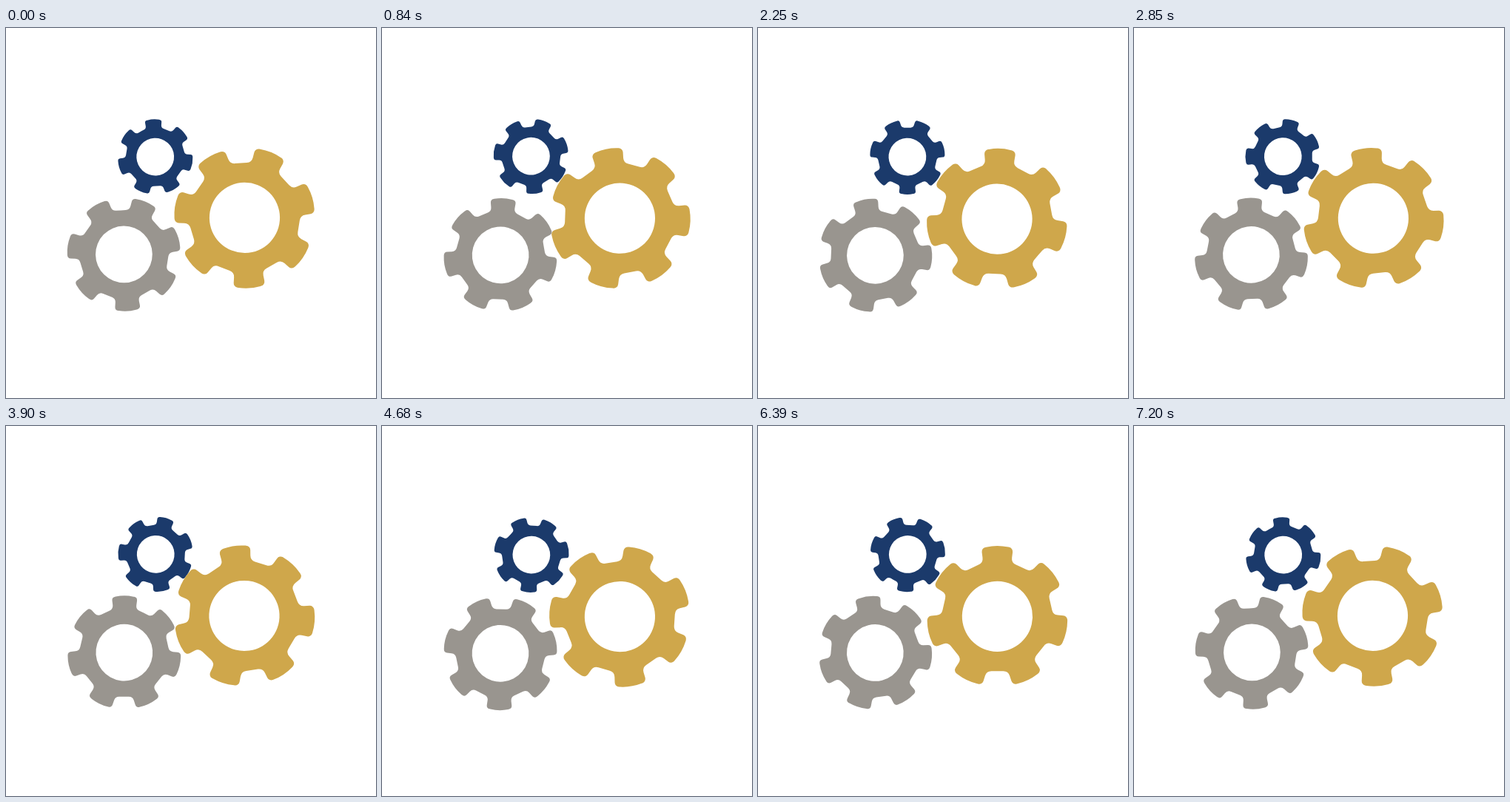
Recreate the animation shown at these times as an HTML page with a canvas. Size 500 px wide and 500 px high, loop 7260 ms.

```html
<!DOCTYPE html>
<html lang="en">
<head>
<meta charset="utf-8">
<title>Gears</title>
<style>
  html, body { margin: 0; height: 100%; overflow: hidden; background: #fff; }
  canvas { display: block; }
</style>
</head>
<body>
<canvas id="stage" width="500" height="500"></canvas>
<script>
const ctx = document.getElementById('stage').getContext('2d');
const TEETH = 7, STEP = 30, TURN_TIME = 7200, LOOP = 7260;

// x, y: pivot; dx, dy: how far the gear sits off its pivot; turns per loop, clockwise
const gears = [
  { x: 201.8, y: 173.6, dx: -0.1, dy: 0.5, size: 0.533, phase: -3.2, turns: 3, color: '#1b3a6b' },
  { x: 159.2, y: 306.8, dx: 0.2, dy: -0.9, size: 0.806, phase: 21.8, turns: 2, color: '#99958f' },
  { x: 322.4, y: 257.4, dx: 0.1, dy: -1, size: 1, phase: 21.8, turns: -2, color: '#cfa74b' }
];

// One tooth pointing up: x, y, corner radius
const tooth = [
  [-19, -73, 9], [-21.5, -92.3, 6], [0, -97, 70], [21.5, -92.3, 6], [19, -73, 9]
];

const rad = deg => deg * Math.PI / 180;

function gearPath() {
  const path = new Path2D();
  const points = [];
  for (let i = 0; i < TEETH; i++) {
    const a = 2 * Math.PI * i / TEETH, c = Math.cos(a), s = Math.sin(a);
    for (const [x, y, r] of tooth) points.push([x * c - y * s, x * s + y * c, r]);
  }
  // Start in the middle of the valley before the first tooth
  const first = points[0], last = points[points.length - 1];
  path.moveTo((first[0] + last[0]) / 2, (first[1] + last[1]) / 2);
  points.forEach(([x, y, r], i) => {
    const next = points[(i + 1) % points.length];
    path.arcTo(x, y, next[0], next[1], r);
  });
  path.closePath();
  path.moveTo(47.6, 0);
  path.arc(0, 0, 47.6, 0, 2 * Math.PI);
  return path;
}

const shape = gearPath();

function draw(now) {
  const t = Math.min(Math.floor(now % LOOP / STEP) * STEP, TURN_TIME);
  ctx.fillStyle = '#fff';
  ctx.fillRect(0, 0, 500, 500);
  for (const g of gears) {
    ctx.save();
    ctx.translate(g.x, g.y);
    ctx.rotate(2 * Math.PI * g.turns * t / TURN_TIME);
    ctx.translate(g.dx, g.dy);
    ctx.rotate(rad(g.phase));
    ctx.scale(g.size, g.size);
    ctx.fillStyle = g.color;
    ctx.fill(shape, 'evenodd');
    ctx.restore();
  }
}

const start = performance.now();
function tick() {
  draw(performance.now() - start);
  requestAnimationFrame(tick);
}
tick();
</script>
</body>
</html>
```
